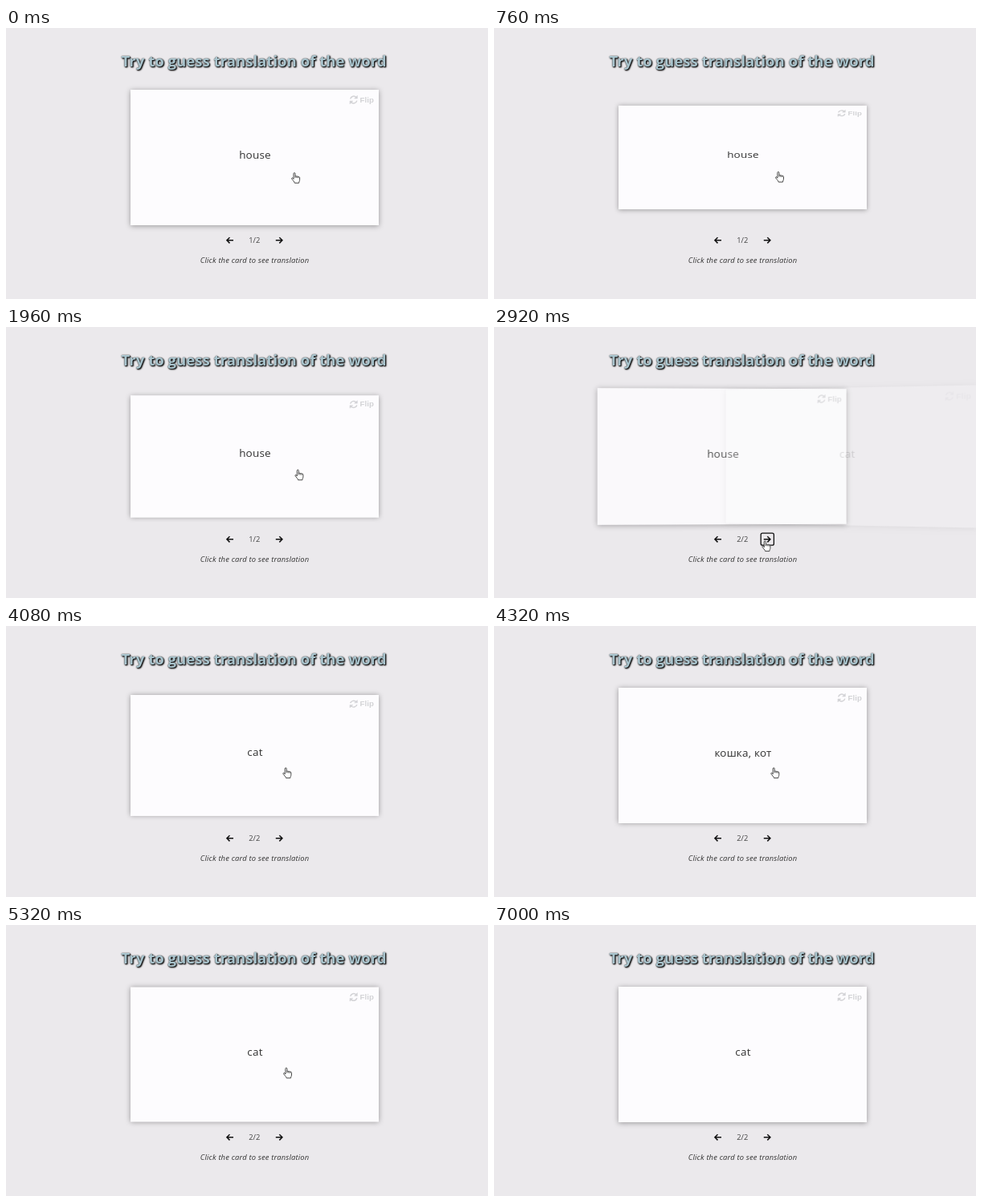
Animation of 600 by 338 pixels, one loop 7.32 s. Source, as an HTML page:

```html
<!DOCTYPE html>
<html lang="en">
<head>
<meta charset="utf-8">
<title>Flashcards</title>
<style>
html, body { margin: 0; width: 100%; height: 100%; overflow: hidden; background: #ebe9ec; }
#stage { position: relative; width: 600px; height: 338px; overflow: hidden; background: #ebe9ec;
  font-family: "Open Sans", "Noto Sans", sans-serif; color: #333; }
#stage > svg { position: absolute; left: 0; top: 0; }
h1 { position: absolute; left: 0; top: 28px; width: 617px; margin: 0; text-align: center; white-space: nowrap;
  font-size: 18.6px; line-height: 26px; font-weight: 700; color: #a9c4cd;
  text-shadow: 1px 1px 1.5px #111, 1px 1px 2px #222, 0 0 1.5px #444; }
.card { position: absolute; left: 154.5px; top: 77.3px; width: 309px; height: 168.6px;
  background: #fdfcfe; box-shadow: 0 .5px 6.5px rgba(0, 0, 0, .36); }
.card svg { position: absolute; left: 0; top: 0; }
</style>
</head>
<body>
<div id="stage">
  <h1>Try to guess translation of the word</h1>
  <svg width="600" height="338">
    <g fill="none" stroke="#111" stroke-width="1.5">
      <path d="M283 264.8H275M278.5 261.2L274.9 264.8L278.5 268.4"/>
      <path d="M335.8 264.8H343.8M340.3 261.2L343.9 264.8L340.3 268.4"/>
      <rect id="ring" x="332.2" y="257.2" width="16.2" height="15" rx="2" stroke-width="1.3"/>
    </g>
    <text id="count" x="309.3" y="268" text-anchor="middle" font-size="9.3" fill="#444"></text>
    <text x="309.6" y="293.4" text-anchor="middle" font-size="9.4" letter-spacing=".19"
      font-style="italic" fill="#333">Click the card to see translation</text>
  </svg>
  <div class="card" id="house"></div>
  <div class="card" id="cat"></div>
  <svg width="600" height="338">
    <path id="hand" fill="#fff" stroke="#333" stroke-width=".9" stroke-linejoin="round"
      d="M3 8.4V1.7C3 .2 5 .2 5 1.7V5C5.4 4.4 6.7 4.5 6.9 5.3C7.4 4.7 8.6 4.8 8.8 5.7C9.5 5.2 10.6 5.6 10.6 6.7V9.4C10.6 10.9 9.7 11.4 9.6 13.3H4.3C4.1 11.6 1.9 10 .8 8.2C.2 7 1.5 6.4 2.3 7.4ZM5 5V6.8M6.9 5.3V7M8.8 5.7V7.2"/>
  </svg>
</div>
<script>
const LOOP = 7320, FLIP = 340, SLIDE = 2832, SLIDE_TIME = 320;
const $ = id => document.getElementById(id);
const words = { house: ["house", "дом"], cat: ["cat", "кошка, кот"] };
const flips = { house: [650, 1710], cat: [3990, 5025] };

// time, x, y of the pointer
const path = [
  [0, 355, 180], [120, 350.4, 179.3], [440, 350.4, 179.3], [480, 349.9, 178.8],
  [1000, 349.9, 178.8], [1240, 359.3, 177.5], [2060, 359.3, 177.5], [2560, 333.3, 266.3],
  [3180, 333.3, 266.3], [3520, 344.2, 176.3], [4990, 344.2, 176.3], [5040, 344.9, 177.6],
  [5380, 344.9, 177.6], [5720, 345, 252], [6240, 338, 277]
];

const clamp = v => Math.min(1, Math.max(0, v));
const mix = (a, b, k) => a + (b - a) * k;

// cubic-bezier(.42, 0, .58, 1)
function ease(x) {
  if (x <= 0 || x >= 1) return clamp(x);
  let lo = 0, hi = 1, u = .5;
  for (let i = 0; i < 20; i++) {
    u = (lo + hi) / 2;
    const bx = 3 * u * (1 - u) * (1 - u) * .42 + 3 * u * u * (1 - u) * .58 + u ** 3;
    if (bx < x) lo = u; else hi = u;
  }
  return u * u * (3 - 2 * u);
}

for (const id in words) {
  $(id).innerHTML = `<svg width="309" height="168.6">
    <text class="word" x="155" y="85.6" text-anchor="middle" font-size="13.5" letter-spacing=".2" fill="#333"></text>
    <g fill="none" stroke="#d3d3d6" stroke-width="1.5">
      <path d="M273.7 11.4A4.2 4.2 0 0 1 281 9.6M281.8 13.6A4.2 4.2 0 0 1 274.4 15.3"/>
      <path d="M282.4 7.2V11H278.6ZM273 17.8V14H276.8Z" fill="#d3d3d6" stroke-width=".5"/>
    </g>
    <text x="285.6" y="15.8" font-size="9.7" font-weight="700" fill="#d3d3d6"
      font-family="Liberation Sans, Arial, sans-serif">Flip</text></svg>`;
}

function drawCard(id, t, slide, opacity) {
  const [there, back] = flips[id];
  const turn = ease((t - there) / FLIP) - ease((t - back) / FLIP);
  const el = $(id), side = turn > .5 ? 1 : 0;
  el.querySelector(".word").textContent = words[id][side];
  el.style.opacity = opacity;
  el.style.visibility = opacity > 0 ? "visible" : "hidden";
  const move = slide ? `translateX(${slide * 154.5}px) perspective(600px) rotateY(${-slide * 9}deg) scale(${1 + .02 * Math.abs(slide)}) ` : "";
  el.style.transform = move + `scaleY(${Math.abs(Math.cos(turn * Math.PI))})`;
}

function drawHand(t) {
  const i = path.findIndex(p => p[0] > t);
  $("hand").style.visibility = i < 0 ? "hidden" : "visible";
  if (i < 0) return;
  const a = path[i - 1], b = path[i];
  let k = (t - a[0]) / (b[0] - a[0]);
  k = k * k * (3 - 2 * k);
  $("hand").setAttribute("transform", `translate(${mix(a[1], b[1], k)} ${mix(a[2], b[2], k)})`);
}

function draw(t) {
  const p = ease((t - SLIDE) / SLIDE_TIME);
  drawCard("house", t, -p, 1 - p);
  drawCard("cat", t, 1 - p, p);
  $("count").textContent = (t < SLIDE ? 1 : 2) + "/2";
  $("ring").style.visibility = t >= SLIDE - 40 && t < 3920 ? "visible" : "hidden";
  drawHand(t);
}

const start = performance.now();
function tick() {
  draw((performance.now() - start) % LOOP);
  requestAnimationFrame(tick);
}
draw(0);
requestAnimationFrame(tick);
</script>
</body>
</html>
```
